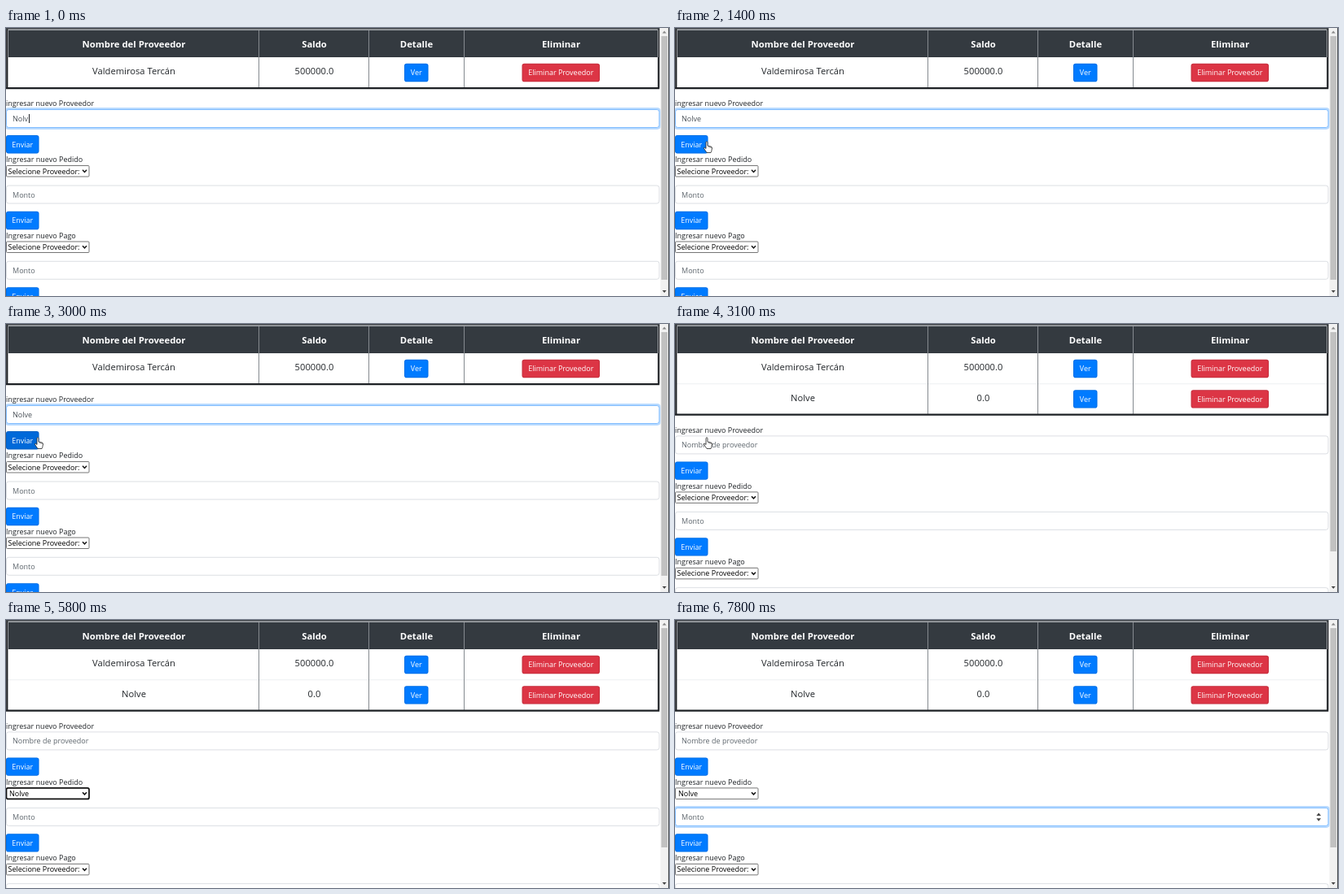
Recreate the animation shown at these times as an HTML page. Size 814x330 px, loop 8 s.

```html
<!DOCTYPE html>
<html lang="es">
<head>
<meta charset="utf-8">
<title>Proveedores</title>
<style>
  html, body { margin: 0; width: 100%; height: 100%; overflow: hidden; background: #fff; }
  svg { display: block; width: 814px; height: 330px; font: 9px "Open Sans", "Noto Sans", sans-serif; }
</style>
</head>
<body>
<svg id="stage" viewBox="0 0 814 330"></svg>
<script>
const LOOP = 8000;
const ROW_HEIGHT = 37.4;
const TYPED_NAME = 'Nolve';
const COLUMNS = [157, 378.5, 504, 681.5];
const INK = '#212529', MUTED = '#5f676e', BLUE = '#007bff', BLUE_HOVER = '#0069d9', RED = '#dc3545';

// Moments of the story, in ms
const LAST_KEY = 100, HOVER = 1400, SENT = 3100, LEAVE = 3600, OPEN_LIST = 4900, PICKED = 5800, TO_AMOUNT = 6100, AMOUNT_RING = 6400;

const stage = document.getElementById('stage');

const rect = (x, y, w, h, fill, extra = '') =>
  `<rect x="${x}" y="${y}" width="${w}" height="${h}" fill="${fill}" ${extra}/>`;
const path = (d, extra) => `<path d="${d}" ${extra}/>`;
const text = (x, y, label, fill = INK, extra = '') =>
  `<text x="${x}" y="${y}" fill="${fill}" ${extra}>${label}</text>`;
const centered = (x, y, label, fill, extra = '') =>
  text(x, y, label, fill, `text-anchor="middle" ${extra}`);

const button = (x, y, w, label, fill = BLUE) =>
  rect(x, y, w, 22.4, fill, 'rx="2.8"')
  + rect(x + 0.5, y + 0.5, w - 1, 21.4, 'none', 'rx="2.4" stroke="#000" stroke-opacity=".1"')
  + centered(x + w / 2, y + 14.5, label, '#fff');

function field(y, label, { color = MUTED, focused = false, caretX = 0, spinner = false } = {}) {
  const halo = focused
    ? rect(-0.5, y - 0.5, 803.5, 24, 'none', 'rx="3.5" stroke="#007bff" stroke-opacity=".28" stroke-width="3"') : '';
  const caret = caretX ? rect(caretX, y + 6, 1, 11, INK) : '';
  const arrows = spinner ? path(`M787.5 ${y + 10}l2.8-3.4 2.8 3.4zm0 3.4l2.8 3.4 2.8-3.4z`, 'fill="#444"') : '';
  return halo
    + rect(0.5, y + 0.5, 801.5, 22, '#fff', `rx="2.8" stroke="${focused ? '#80bdff' : '#dcdfe3'}"`)
    + text(8, y + 15, label, color) + caret + arrows;
}

function select(y, chosen, focused) {
  const border = focused ? 'rx="2" stroke="#101010" stroke-width="1.7"' : 'rx="1" stroke="#767676"';
  return rect(0.5, y + 0.5, 101.5, 13.5, '#fff', border)
    + text(chosen ? 4 : 2.5, y + 10.6, chosen || 'Selecione Proveedor:', '#000')
    + path(`M94 ${y + 5.8}l2.5 2.6 2.5-2.6`, 'fill="none" stroke="#111" stroke-width="1.5"');
}

function table(rows) {
  const bottom = 36 + rows.length * ROW_HEIGHT;
  const cell = 'font-size="11.2"';
  let out = rect(0, 0, 802.5, bottom + 2, '#fff') + rect(1, 2, 801, 34, '#343a40');
  ['Nombre del Proveedor', 'Saldo', 'Detalle', 'Eliminar'].forEach((title, i) => {
    out += centered(COLUMNS[i], 23.7, title, '#fff', 'font-size="11.3" font-weight="700"');
  });
  rows.forEach(([name, balance], i) => {
    const y = 36 + i * ROW_HEIGHT;
    if (i) out += rect(2, y, 799, 0.8, '#e8ebee');
    out += centered(COLUMNS[0], y + 21.2, name, INK, cell)
      + centered(COLUMNS[1], y + 21.2, balance, INK, cell)
      + button(489, y + 7.8, 29.5, 'Ver')
      + button(633.5, y + 7.8, 95.5, 'Eliminar Proveedor', RED);
  });
  for (const x of [310, 445, 562]) out += rect(x, 2, 1, bottom - 2, '#858a8f');
  return out
    + path(`M1.3 1V${bottom}M801.3 1V${bottom}M0 ${bottom + 0.8}H802.3`, 'fill="none" stroke="#1d2024" stroke-width="2.2"')
    + rect(0, 0, 802.5, 1.6, '#3d4247')
    + path('M2.5 36V2.5H800.5V36', 'fill="none" stroke="#a4a8ac" stroke-width=".9"');
}

function scrollbar(thumbHeight) {
  return rect(803.5, 0, 9.5, 330, '#f1f1f1')
    + rect(804.5, 10, 7.5, thumbHeight, '#c1c1c1')
    + path('M805.8 6.6l2.5-3 2.5 3z', 'fill="#8a8a8a"')
    + path('M805.8 323l2.5 3 2.5-3z', 'fill="#444"')
    + rect(813, 0, 1, 330, '#55585b');
}

const outline = 'fill="#fff" stroke="#222" stroke-width=".8" stroke-linejoin="round"';
const arrow = (x, y) =>
  path(`M${x} ${y}v10.6l2.4-2.2 1.7 3.9 1.8-.8-1.7-3.7h3.4z`, outline);
const hand = (x, y) =>
  path(`M${x - 1} ${y + 1}q1-1.8 2 0v4.6l4 .9q1.6.4 1.5 2l-.7 3.5-.8 2h-5l-3.4-5q-.6-1.6 1-1.2l1.4 1.2z`, outline)
  + path(`M${x + 3} ${y + 6}v2m2-1.6v2`, 'stroke="#222" stroke-width=".6"');

// Pointer stops: [time, x, y]
const POINTER = [
  [800, 60, 112], [HOVER, 39, 139.5], [LEAVE, 39, 139.5], [3900, 55, 157],
  [4200, 55, 157], [4600, 62.5, 214.5], [PICKED, 62.5, 214.5],
];

function pointer(t) {
  const next = POINTER.findIndex(stop => stop[0] > t);
  if (next < 1) return '';
  const [t0, x0, y0] = POINTER[next - 1], [t1, x1, y1] = POINTER[next];
  const p = (t - t0) / (t1 - t0), k = p * p * (3 - 2 * p);
  const x = x0 + (x1 - x0) * k, y = y0 + (y1 - y0) * k;
  if (t >= HOVER && t < LEAVE) return hand(x, y);
  const fieldBottom = t < SENT ? 123 : 160;
  return y < fieldBottom ? '' : arrow(x, y);
}

function scene(t) {
  const sent = t >= SENT;
  const rows = [['Valdemirosa Tercán', '500000.0']];
  if (sent) rows.push([TYPED_NAME, '0.0']);
  const typed = TYPED_NAME.slice(0, t < LAST_KEY ? 4 : 5);
  const nameField = sent
    ? field(100, 'Nombre de proveedor')
    : field(100, typed, { color: '#495057', focused: true, caretX: t < LAST_KEY ? 28 : t < 600 ? 33 : 0 });
  const amountFocused = t >= AMOUNT_RING;
  const caretOn = amountFocused && Math.floor((t - 6300) / 500) % 2 === 0;

  const form = text(0, 96.3, 'ingresar nuevo Proveedor')
    + nameField
    + button(0, 132, 40.5, 'Enviar', t > HOVER + 50 && !sent ? BLUE_HOVER : BLUE)
    + text(0, 165.3, 'Ingresar nuevo Pedido')
    + select(169, t >= PICKED ? TYPED_NAME : '', t >= OPEN_LIST && t < TO_AMOUNT)
    + field(193.5, 'Monto', { focused: amountFocused, caretX: caretOn ? 8 : 0, spinner: t >= TO_AMOUNT })
    + button(0, 225.8, 40.5, 'Enviar')
    + text(0, 258.8, 'Ingresar nuevo Pago')
    + select(262.5, '', false)
    + field(286.8, 'Monto')
    + button(0, 319.2, 40.5, 'Enviar');

  return table(rows) + `<g transform="translate(0 ${sent ? ROW_HEIGHT : 0})">${form}</g>`
    + scrollbar(sent ? 270 : 300) + pointer(t);
}

let shown = '';
function draw(now) {
  const markup = scene(now % LOOP);
  if (markup !== shown) stage.innerHTML = shown = markup;
  requestAnimationFrame(draw);
}
draw(performance.now());
</script>
</body>
</html>
```
